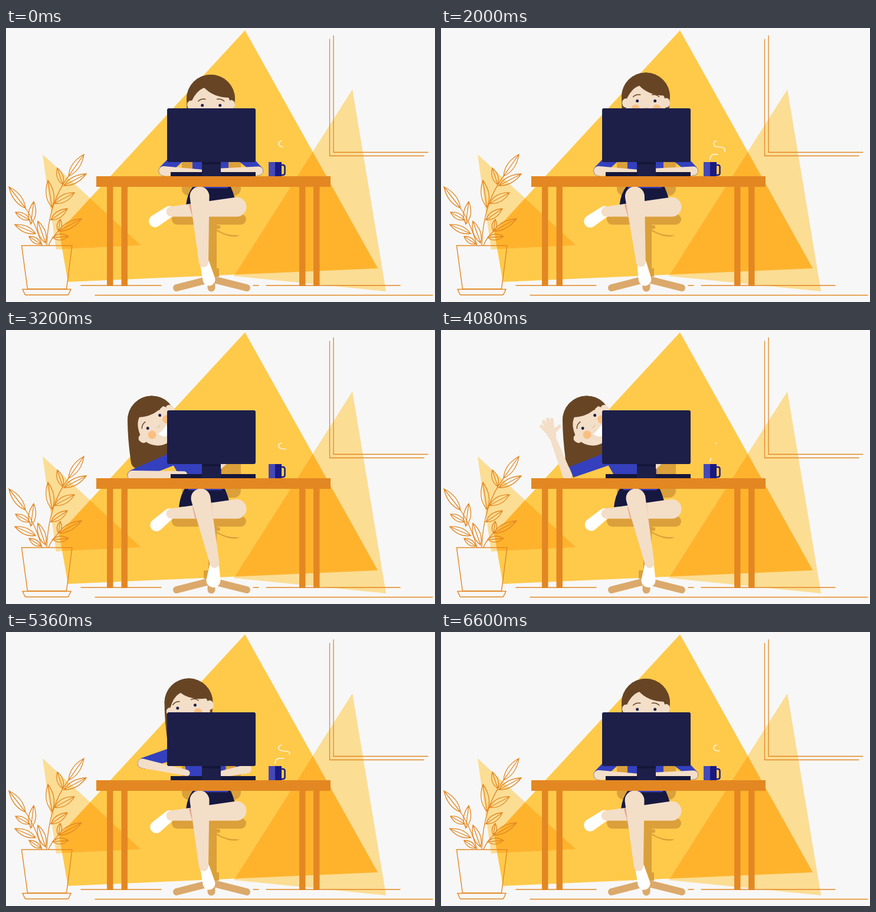
Recreate the animation shown at these times as an HTML page with a canvas. Size 727x464 px, loop 6640 ms.

```html
<!DOCTYPE html>
<html lang="en">
<head>
<meta charset="utf-8">
<title>At the desk</title>
<style>
html, body { margin: 0; width: 100%; height: 100%; overflow: hidden; background: #f7f7f7; }
canvas { display: block; width: 727px; height: 464px; }
</style>
</head>
<body>
<canvas id="stage" width="727" height="464"></canvas>
<script>
const ctx = document.getElementById('stage').getContext('2d');
const LOOP = 6640, TAU = Math.PI * 2;
const BG = '#f7f7f7', ORANGE = '#e38722', SKIN = '#f3dec8', HAIR = '#674524';
const BLUE = '#3440bd', NAVY = '#1d1f49', DARK = '#15173a', CHAIR = '#dba03a', TAN = '#dba96b';

// timing helpers
const clamp = v => Math.max(0, Math.min(1, v));
const lerp = (a, b, k) => a + (b - a) * k;
const ease = (t, a, b) => (1 - Math.cos(Math.PI * clamp((t - a) / (b - a)))) / 2;
const pulse = (t, a, b, c, d) => ease(t, a, b) - ease(t, c, d);

// drawing helpers
function trace(pts) {
  ctx.beginPath();
  pts.forEach(([x, y]) => ctx.lineTo(x, y));
}
function poly(color, ...pts) {
  trace(pts);
  ctx.closePath();
  ctx.fillStyle = color;
  ctx.fill();
}
function line(color, width, ...pts) {
  trace(pts);
  ctx.strokeStyle = color;
  ctx.lineWidth = width;
  ctx.stroke();
}
function rect(color, x, y, x2, y2, r = 0) {
  ctx.beginPath();
  ctx.roundRect(x, y, x2 - x, y2 - y, r);
  ctx.fillStyle = color;
  ctx.fill();
}
function oval(color, x, y, rx, ry = rx) {
  ctx.beginPath();
  ctx.ellipse(x, y, rx, ry, 0, 0, TAU);
  ctx.fillStyle = color;
  ctx.fill();
}
function curve(d, color, width) {
  const p = new Path2D(d);
  if (width) {
    ctx.strokeStyle = color;
    ctx.lineWidth = width;
    ctx.stroke(p);
  } else {
    ctx.fillStyle = color;
    ctx.fill(p);
  }
}
// limb with a round end of its own radius on each side
function taper(color, x1, y1, r1, x2, y2, r2) {
  const dir = Math.atan2(y2 - y1, x2 - x1);
  const half = Math.acos((r1 - r2) / Math.hypot(x2 - x1, y2 - y1));
  ctx.beginPath();
  ctx.arc(x1, y1, r1, dir + half, dir - half + TAU);
  ctx.arc(x2, y2, r2, dir - half, dir + half);
  ctx.closePath();
  ctx.fillStyle = color;
  ctx.fill();
}

const PEAK = [[405, 4], [630, 407], [105, 430], [90, 345]];
function triangle(...pts) {
  poly('#fbdd94', ...pts);
  ctx.save();
  trace(PEAK);
  ctx.clip();
  poly('#ffb32d', ...pts);
  ctx.restore();
}

function leaf(x, y, tx, ty, w) {
  const len = Math.hypot(tx - x, ty - y);
  const nx = (ty - y) / len * w, ny = -(tx - x) / len * w;
  const mx = lerp(x, tx, .45), my = lerp(y, ty, .45);
  curve(`M${x},${y}Q${mx + nx},${my + ny} ${tx},${ty}Q${mx - nx},${my - ny} ${x},${y}L${tx},${ty}`, ORANGE, 1.3);
}
const LEAVES = [
  [106, 251, 132, 214, 12], [98, 267, 136, 247, 11], [96, 265, 87, 237, 10], [78, 304, 71, 258, 13],
  [82, 297, 116, 279, 12], [76, 325, 104, 306, 11], [89, 344, 128, 323, 11], [89, 344, 92, 324, 8],
  [79, 355, 106, 353, 10], [67, 364, 54, 327, 12], [33, 305, 5, 269, 12], [42, 332, 47, 294, 12],
  [40, 325, 16, 312, 10], [50, 348, 15, 333, 11], [59, 366, 39, 353, 9]
];

function backdrop() {
  ctx.fillStyle = BG;
  ctx.fillRect(0, 0, 727, 464);
  poly('#ffca4a', ...PEAK);
  triangle([62, 214], [229, 368], [85, 375]);
  triangle([587, 104], [644, 446], [386, 420]);
  line(ORANGE, 1.3, [548.5, 19], [548.5, 216.5], [708, 216.5]);
  line(ORANGE, 1.3, [555, 13], [555, 210.5], [715, 210.5]);
  for (const [a, b, y] of [[127, 263, 436], [419, 428, 436], [441, 668, 436], [151, 723, 452.5]])
    line(ORANGE, 1.3, [a, y], [b, y]);
}

function plant() {
  curve('M69,368Q72,295 106,251M61,368Q50,330 33,305M72,368Q78,354 89,344', ORANGE, 1.3);
  LEAVES.forEach(l => leaf(...l));
  curve('M26.500,368.500H112L102.500,442H36.500Z', ORANGE, 1.4);
  curve('M28,442.500H110L106.500,450Q106,452 104,452H34Q32,452 31.500,450Z', ORANGE, 1.4);
}

function chair() {
  rect(CHAIR, 298, 205, 398, 284, 12);
  rect(CHAIR, 343, 330, 357, 410);
  rect(CHAIR, 335, 407, 361, 421);
  rect(CHAIR, 355, 334, 363, 340, 2);
  curve('M357,341Q372,352 396,351Q390,355 376,352Q367,349 357,344Z', CHAIR);
  rect(CHAIR, 281, 315, 407, 333, 9);
  line(TAN, 12, [289, 440], [348, 425], [408, 440]);
  line(TAN, 13, [348, 427], [348, 440]);
}

function legs(k, swing) {
  const left = lerp(305, 293, k), dx = -10 * k;
  curve(`M${left},300Q${left + 2},280 ${lerp(318, 304, k)},267H${380 + dx}Q${385 + dx},278 ${388 + dx},289L345,296Z`, '#161840');
  line(BLUE, 2.5, [320 + dx, 270], [375 + dx, 270]);
  // crossed leg
  ctx.save();
  ctx.translate(280, 311);
  ctx.rotate(-swing * .155);
  taper('#fff', -27.5, 16, 10.5, -3, 0, 9.5);
  ctx.restore();
  taper(SKIN, 280, 311, 8.5, 391, 303, 16.5);
  // standing leg
  const kx = lerp(328, 330, k), ax = lerp(335, 353.5, k);
  line('#e3a993', 4, [lerp(312, 318, k), 300], [lerp(317, 322, k), 317]);
  if (k > .1) line('#e3a993', 3 * k, [lerp(341, 347, k), 294], [lerp(341, 349, k), 314]);
  taper('#fff', lerp(337, 353, k), 399, 8, lerp(344, 351.5, k), lerp(426, 424, k), lerp(10.5, 12, k));
  taper(SKIN, kx, 285, 16.5, ax, lerp(397, 395, k), 8);
}

function head(s, up, mouth) {
  const x = 347 - 100 * s, y = 120 - 3.5 * up + 36 * Math.pow(s, 2.5);
  // long hair keeps hanging straight while the face tilts
  curve(`M${x - 41},${y}A41,41 0 0 1 ${x + 41},${y}L${x + 36},${y + 76}L${x - 20},${y + 84}Q${x - 34},${y + 82} ${x - 35.5},${y + 70}Q${x - 41},${y + 30} ${x - 41},${y}Z`, HAIR);
  ctx.save();
  ctx.translate(x, y);
  ctx.rotate(-47 * Math.PI / 180 * Math.pow(s, 1.6));
  oval(SKIN, -34, 10, 6, 8);
  oval(SKIN, 35, 10, 6, 8);
  oval(SKIN, 0, 13.5, 34);
  ctx.save();
  ctx.translate(.7 - 6 * Math.sin(Math.PI * s) - s * .5, 11 - 4 * up - 2.5 * s);
  for (const side of [-1, 1]) {
    oval('#fbbf80', side * 18, 13, 7);
    oval(NAVY, side * 15, 0, 2.5);
    curve(`M${side * 22},-7Q${side * 17},-12 ${side * 10},-10.500`, HAIR, 1.5);
  }
  curve('M-3,11Q0,14 3,11', '#e5bd98', 1.2);
  if (mouth > .05) curve(`M-10,19Q0,22 10,19Q8,${22 + 11 * mouth} 0,${22 + 11 * mouth}Q-8,${22 + 11 * mouth} -10,19Z`, '#fff');
  else curve('M-8,20Q0,25 8,20', '#9a6a4a', 1.1);
  ctx.restore();
  curve('M-41,3V0A41,41 0 0 1 41,0L40,4Q36,3 33,-2Q4,-2 -12,-20Q-25,-12 -32,3Q-36,2 -39,6Z', HAIR);
  ctx.restore();
}

function hand() {
  oval(SKIN, 13, 1, 9);
  for (const [f, r] of [[26, -11], [32, -4.5], [33, 3], [30, 9.5], [15, 17]])
    line(SKIN, 6, [10, r * .35], [f, r]);
  poly(SKIN, [-2, -5], [10, -8], [10, 9], [-2, 5]);
}

function arms(s, w, t) {
  const bow = s * (1 - s);
  // right arm
  const rx = 428 - 52 * s, ry = 242 - 27 * s;
  taper(BLUE, 388 - 43 * s, 205 - 5 * s, 12, rx, ry, 8 - 4 * s);
  taper(SKIN, rx, ry, 7.5, 356 - 8 * s, 243, 5);
  // left arm
  const ex = 267 - 53 * s - 68 * bow, ey = 242 + 4 * s - 90 * bow;
  const sx = 306 - 23 * s - 13 * bow, sy = 205 + 13 * s - 33 * bow;
  const d = Math.hypot(sx - ex, sy - ey), ux = (sx - ex) / d, uy = (sy - ey) / d;
  const cx = ex + ux * 7 * w, cy = ey + uy * 7 * w - 3 * w;
  poly(BLUE, [cx + uy * 9, cy - ux * 9], [sx + uy * 11, sy - ux * 11],
    [sx - uy * 11, sy + ux * 11], [cx - uy * 10, cy + ux * 10]);
  if (w < 1) oval(BLUE, ex, ey, 8.5 * (1 - w));
  const rest = Math.atan2(244 - ey, 310 - ex);
  const wave = (-101 - 10.5 * Math.cos(TAU * (t - 4100) / 460)) * Math.PI / 180;
  const len = lerp(lerp(71, 88, s), 67, w);
  ctx.save();
  ctx.translate(ex, ey);
  ctx.rotate(lerp(rest, wave, w));
  taper(SKIN, 0, 0, 8, len, 0, 5);
  if (w > .05) {
    ctx.translate(len, 0);
    hand();
  }
  ctx.restore();
}

function desk() {
  for (const x of [171, 195.5, 497, 521]) rect(ORANGE, x, 260, x + 10.5, 437);
  rect(NAVY, 332, 226, 364, 246);
  rect(DARK, 332, 226, 364, 231);
  rect(DARK, 279, 244, 423, 252);
  rect(NAVY, 332, 231, 364, 251);
  rect(NAVY, 273, 136, 423, 227, 3);
  ctx.beginPath();
  ctx.roundRect(461, 232, 11.5, 17, 3);
  ctx.strokeStyle = '#191a80';
  ctx.lineWidth = 2.5;
  ctx.stroke();
  rect('#4549b8', 445, 227, 457, 251);
  rect('#191a80', 456, 227, 467, 251);
  rect(ORANGE, 153, 251, 550, 269);
}

const STEAM = 'M456,223C457,210 466,215 474,214Q481,213 481,208Q481,202 475,202L467,201Q462,200 462,196Q462,192 467,191.500';
function wisp(tail, tip) {
  tail = Math.max(0, tail);
  tip = Math.min(66, tip);
  if (tip <= tail) return;
  ctx.setLineDash([tip - tail, 200]);
  ctx.lineDashOffset = -tail;
  curve(STEAM, '#fdf4e3', 1.6);
  ctx.setLineDash([]);
}
function steam(t) {
  const c = t % (LOOP / 2);
  wisp(.0465 * (c - 1300), .051 * (c - 650));
  wisp(.0415 * (c - 2150), .049 * (c - 1620));
  if (c < 790) wisp(49.5 + .02 * c, 66);
}

function draw(t) {
  const lean = pulse(t, 2000, 2570, 4905, 5690);
  const hips = pulse(t, 1860, 2330, 4800, 5270);
  const raise = pulse(t, 3230, 3620, 5030, 5400);
  const mouth = pulse(t, 2700, 2950, 4720, 4940);
  const up = ease(t, 760, 1000) - .55 * pulse(t, 1140, 1320, 1400, 1640) - ease(t, 5900, 6340);
  const swing = (1 - Math.cos(TAU * 7 * t / LOOP)) / 2;

  ctx.lineCap = 'round';
  ctx.lineJoin = 'miter';
  backdrop();
  plant();
  chair();
  head(lean, up, mouth);
  poly(BLUE, [306 - 33 * lean, 200 + 15 * lean], [388 - 43 * lean, 200 - 5 * lean], [377 - 12 * lean, 227],
    [377 - 12 * lean, 268], [316 - 10 * lean, 268], [316 - 33 * lean, 228]);
  arms(lean, raise, t);
  legs(hips, swing);
  desk();
  steam(t);
}

const start = performance.now();
function tick() {
  draw((performance.now() - start) % LOOP);
  requestAnimationFrame(tick);
}
tick();
</script>
</body>
</html>
```
